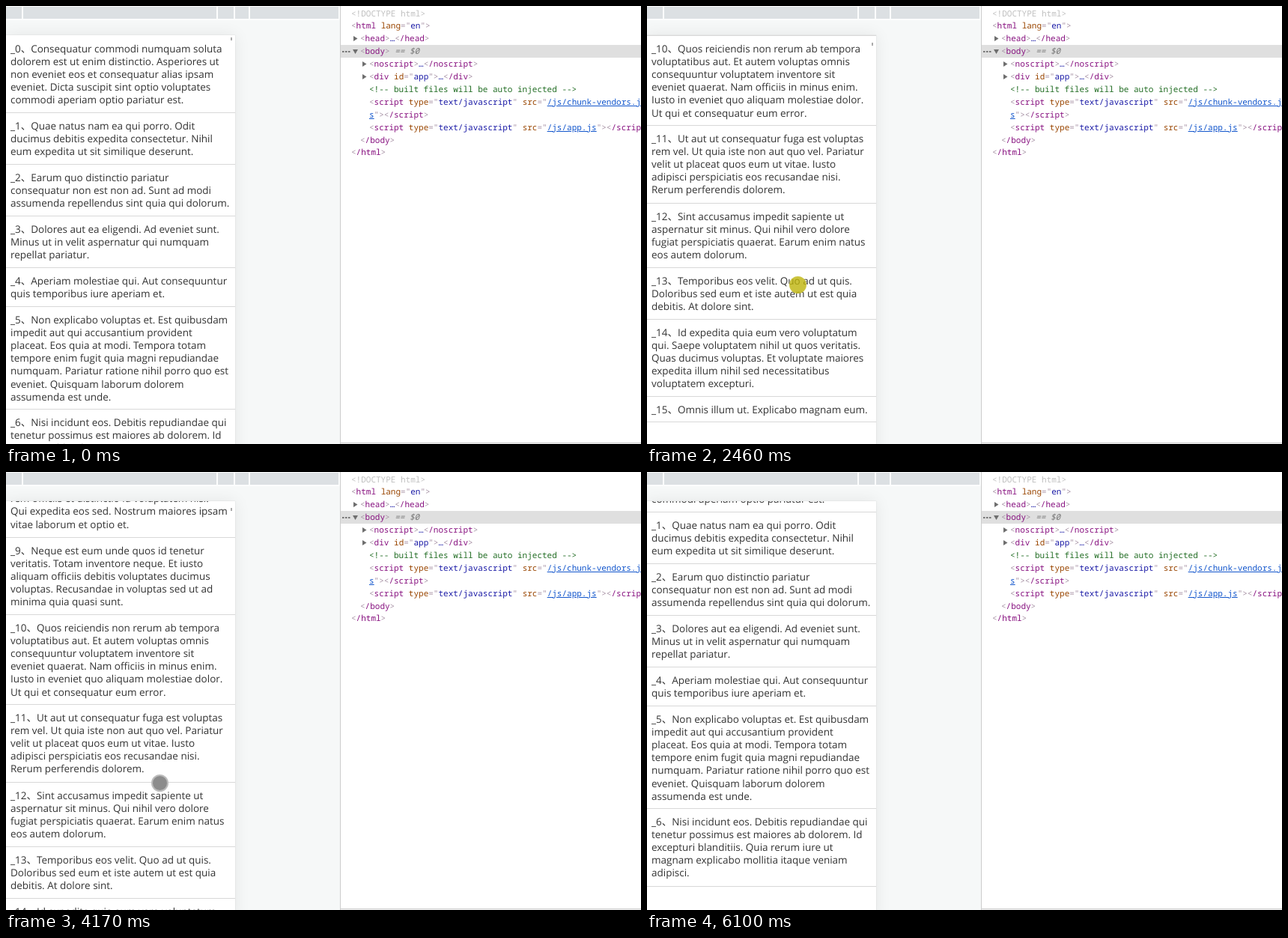
Animation, 848 px wide and 585 px high, one loop 6730 ms. Source, as an HTML page:

```html
<!DOCTYPE html>
<html lang="zh-CN">
<head>
<meta charset="utf-8">
<title>Virtual list</title>
<style>
html, body { margin: 0; width: 100%; height: 100%; overflow: hidden; background: #fff; }
#stage { position: absolute; left: 0; top: 0; width: 848px; height: 585px; overflow: hidden; background: #fff; text-rendering: geometricPrecision; }
#stage div, #stage svg { position: absolute; }
#page { left: 0; top: 0; width: 446px; height: 585px; background: #f6f8f8; overflow: hidden; }
#ruler { left: 0; top: 1px; width: 444px; height: 16px; background: #dce0e3; box-shadow: 0 0 0 2px #fcfdfd; }
#ruler div { top: 0; width: 2px; height: 16px; background: #fcfdfd; }
#phone { left: 0; top: 39px; width: 306px; height: 560px; background: #fff; overflow: hidden; }
#shade { left: 0; top: 39px; width: 306px; height: 560px; box-shadow: 0 0 1px rgba(0,0,0,.2), 0 0 20px rgba(0,0,0,.08); }
#list { left: 0; top: 1px; }
.item {
  left: 0; top: 0; width: 306px; padding: 8.61px 0 0 6px; box-sizing: border-box;
  border-bottom: 1px solid #d8d8d8; white-space: pre; color: #333;
  font: 13.47px/17.22px "Open Sans", "Noto Sans CJK SC", "Noto Sans CJK", sans-serif;
}
#thumb { left: 300px; top: 3px; width: 2px; height: 4px; background: #aaa; }
#tools { left: 446px; top: 0; width: 402px; height: 585px; background: #fff; border-left: 1px solid #ccc; box-sizing: border-box; overflow: hidden; }
#row { left: 0; top: 52px; width: 402px; height: 17px; background: #dfdfdf; }
#foot { left: 0; top: 583px; width: 402px; height: 2px; background: #f3f3f3; border-top: 1px solid #ccc; box-sizing: border-box; }
.line { white-space: pre; height: 17px; font: 11px/17px "Noto Sans Mono", "Liberation Mono", monospace; color: #a894a6; }
.line b { font-weight: 400; color: #881280; }
.line i { font-style: normal; color: #994500; }
.line q { quotes: none; color: #1a1aa6; }
.line u { color: #15c; }
.line em { color: #777; }
.line s { text-decoration: none; color: #236e25; }
.line small { font-size: inherit; color: #c0c0c0; }
#dot { left: -11.5px; top: -11.5px; width: 23px; height: 23px; border-radius: 50%; box-sizing: border-box; }
#dot.idle { background: #8c8c8c; border: 2px solid #bcbcbc; }
#dot.soft { background: rgba(60,60,60,.62); border: 1px solid rgba(190,190,190,.5); }
#dot.down { background: rgba(190,180,10,.8); border: 1px solid rgba(205,198,70,.8); }
</style>
</head>
<body>
<div id="stage">
  <div id="page">
    <div id="ruler"></div>
    <div id="shade"></div>
    <div id="phone"><div id="list"></div><div id="thumb"></div></div>
  </div>
  <div id="tools">
    <div id="row"></div>
    <svg width="60" height="110" style="left:0;top:0">
      <path d="M17 40l5.5 3.5-5.5 3.5zM29 74l5.5 3.5-5.5 3.5zM29 91l5.5 3.5-5.5 3.5zM16 58h7l-3.500 6z" fill="#6e6e6e"/>
      <path d="M2 60h2.500v2h-2.500zM6 60h2.500v2h-2.500zM10 60h2.500v2h-2.500z" fill="#777"/>
    </svg>
    <div id="foot"></div>
  </div>
  <div id="cursor">
    <div id="dot"></div>
    <svg id="arrow" width="13" height="20" style="left:0;top:0"><path d="M.5.5v15l3.500-3.300 2.300 5.300 2.200-1-2.300-5.200h4.800z" fill="#fff" stroke="#000"/></svg>
  </div>
</div>
<script>
const LOOP = 6730, FIRST = 130, STEP = 77.5, LINE = 17.22, SHOWN = 7, SWING = 150;
const $ = id => document.getElementById(id);

const texts = `Consequatur commodi numquam soluta|dolorem est ut enim distinctio. Asperiores ut|non eveniet eos et consequatur alias ipsam|eveniet. Dicta suscipit sint optio voluptates|commodi aperiam optio pariatur est.
Quae natus nam ea qui porro. Odit|ducimus debitis expedita consectetur. Nihil|eum expedita ut sit similique deserunt.
Earum quo distinctio pariatur|consequatur non est non ad. Sunt ad modi|assumenda repellendus sint quia qui dolorum.
Dolores aut ea eligendi. Ad eveniet sunt.|Minus ut in velit aspernatur qui numquam|repellat pariatur.
Aperiam molestiae qui. Aut consequuntur|quis temporibus iure aperiam et.
Non explicabo voluptas et. Est quibusdam|impedit aut qui accusantium provident|placeat. Eos quia at modi. Tempora totam|tempore enim fugit quia magni repudiandae|numquam. Pariatur ratione nihil porro quo est|eveniet. Quisquam laborum dolorem|assumenda est unde.
Nisi incidunt eos. Debitis repudiandae qui|tenetur possimus est maiores ab dolorem. Id|excepturi blanditiis. Quia rerum iure ut|magnam explicabo mollitia itaque veniam|adipisci.
Aspernatur est nihil commodi id dolorem|qui excepturi ad. Illo ea perspiciatis vitae|corporis est. Debitis facilis et voluptas vitae|quam recusandae sapiente veritatis. Enim|officiis et incidunt.
Sed alias quis sint aliquid voluptatem|quam assumenda sit est. Et illum accusamus|distinctio ea veritatis suscipit. Quos tempora|rem officiis et distinctio id voluptatem nisi.|Qui expedita eos sed. Nostrum maiores ipsam|vitae laborum et optio et.
Neque est eum unde quos id tenetur|veritatis. Totam inventore neque. Et iusto|aliquam officiis debitis voluptates ducimus|voluptas. Recusandae in voluptas sed ut ad|minima quia quasi sunt.
Quos reiciendis non rerum ab tempora|voluptatibus aut. Et autem voluptas omnis|consequuntur voluptatem inventore sit|eveniet quaerat. Nam officiis in minus enim.|Iusto in eveniet quo aliquam molestiae dolor.|Ut qui et consequatur eum error.
Ut aut ut consequatur fuga est voluptas|rem vel. Ut quia iste non aut quo vel. Pariatur|velit ut placeat quos eum ut vitae. Iusto|adipisci perspiciatis eos recusandae nisi.|Rerum perferendis dolorem.
Sint accusamus impedit sapiente ut|aspernatur sit minus. Qui nihil vero dolore|fugiat perspiciatis quaerat. Earum enim natus|eos autem dolorum.
Temporibus eos velit. Quo ad ut quis.|Doloribus sed eum et iste autem ut est quia|debitis. At dolore sint.
Id expedita quia eum vero voluptatum|qui. Saepe voluptatem nihil ut quos veritatis.|Quas ducimus voluptas. Et voluptate maiores|expedita illum nihil sed necessitatibus|voluptatem excepturi.
Omnis illum ut. Explicabo magnam eum.
Ullam eos aut at accusantium quia odit.|Ut quis qui voluptatem adipisci laudantium|unde voluptatem velit. Alias voluptate|pariatur et molestiae sit qui facere. Sit et|asperiores reprehenderit quibusdam hic.|Dolor voluptas fuga hic dicta dignissimos|dolores fuga nobis. Fugit ex velit voluptatum.
Tempore aliquid voluptas. Placeat omnis|labore. Rerum illum fugit. Deserunt amet|omnis. Accusantium nam voluptatum et|expedita sed maxime neque voluptatem|eligendi.
Quia dolores et ipsum. Modi tempora sed|voluptas aut nihil. Et quas rerum omnis|sapiente ut est. Vel minima dolorem quo|facilis et numquam. Autem iste natus|occaecati.`.split("\n");

function add(parent, cls, html, css) {
  const el = document.createElement("div");
  el.className = cls;
  el.innerHTML = html;
  Object.assign(el.style, css);
  parent.append(el);
  return el;
}

for (const x of [21, 281, 304, 324]) add($("ruler"), "", "", { left: x + "px" });

let height = 0;
const items = texts.map((text, i) => {
  const lines = text.split("|");
  const top = height;
  height += (lines.length + 1) * LINE;
  const el = add($("list"), "item", `_${i}、` + lines.join("\n"),
    { height: Math.round(height) - Math.round(top) + "px" });
  return { el, top, end: height };
});

// Markup rows: indent and syntax-coloured source
const open = (name, attrs = "") => `&lt;<b>${name}</b>${attrs}&gt;`;
const close = name => open("/" + name);
const attr = (key, val) => ` <i>${key}</i>="<q>${val}</q>"`;
const src = path => attr("type", "text/javascript") + ` <i>src</i>="<u>${path}</u>`;
const rows = [
  [0, "<small>&lt;!DOCTYPE html&gt;</small>"],
  [0, open("html", attr("lang", "en"))],
  [1, open("head") + "<q>…</q>" + close("head")],
  [1, open("body") + "<em> == $0</em>"],
  [2, open("noscript") + "<q>…</q>" + close("noscript")],
  [2, open("div", attr("id", "app")) + "<q>…</q>" + close("div")],
  [2, "<s>&lt;!-- built files will be auto injected --&gt;</s>"],
  [2, "&lt;<b>script</b>" + src("/js/chunk-vendors.j")],
  [2, '<u>s</u>"&gt;' + close("script")],
  [2, "&lt;<b>script</b>" + src("/js/app.js") + '"&gt;' + close("script")],
  [1, close("body")],
  [0, close("html")]
];
rows.forEach(([indent, html], i) =>
  add($("tools"), "line", html, { left: 14 + indent * 12 + "px", top: Math.round(1.5 + i * 16.9) + "px" }));

// Where each gesture begins: time, pointer, scroll offset and look of the dot
const moves = [
  { t: 130, x: 659, y: 330, offset: 0, look: "idle" },
  { t: 440, x: 190, y: 420, offset: 0, look: "idle" },
  { t: 1215, x: 188, y: 225, offset: 409.4, look: "idle" },
  { t: 1912, x: 198, y: 187, offset: 680.6, look: "idle" },
  { t: 2920, x: 203, y: 254, offset: 1127, look: "soft" },
  { t: 3152, x: 203, y: 254, offset: 1215, look: "idle" },
  { t: 3230, x: 203, y: 254, offset: 1215, look: "idle" },
  { t: 4160, x: 205, y: 415, offset: 778.6, look: "idle" },
  { t: 5167, x: 196, y: 364, offset: 246.5, look: "down" },
  { t: 5400, x: 196, y: 430, offset: 120, look: "idle" },
  { t: 5720, x: 730, y: 430, offset: 89.3, look: "idle" }
];

// In a long move the finger first swings back, then presses and drags the list
function pose(t) {
  const n = moves.findLastIndex(move => move.t <= t);
  if (n < 0) return moves[0];
  const a = moves[n], b = moves[n + 1];
  if (!b) return a;
  const p = (t - a.t) / (b.t - a.t);
  const mix = (key, q) => a[key] + (b[key] - a[key]) * q;
  const swipe = b.t - a.t > 600;
  const back = swipe ? Math.sign(b.offset - a.offset) * SWING * Math.sin(Math.PI * p) : 0;
  return {
    x: mix("x", p),
    y: mix("y", p) + back,
    offset: mix("offset", swipe ? p - 0.08 * Math.sin(2 * Math.PI * p) : p),
    look: swipe && p > 0.5 && p < 0.95 ? "down" : a.look
  };
}

function draw(now) {
  const step = Math.floor((now - FIRST + 12) / STEP);
  const { x, y, offset, look } = pose(step < 0 ? 0 : FIRST + step * STEP);

  // Only a fixed count of rows exists, starting at the first one in view
  const first = items.findIndex(item => item.end > offset);
  items.forEach(({ el, top }, i) => {
    el.style.display = i >= first && i < first + SHOWN ? "" : "none";
    el.style.transform = `translateY(${Math.round(top) - Math.round(offset)}px)`;
  });
  $("thumb").style.transform = `translateY(${Math.round(offset * 0.0073)}px)`;
  $("thumb").style.opacity = Math.min(1, Math.max(0, 1 - (step - 74) / 3));

  const touch = x < 296;
  $("cursor").style.display = step < 0 || step >= 73 ? "none" : "";
  $("cursor").style.transform = `translate(${Math.round(x)}px,${Math.round(y)}px)`;
  $("dot").className = look;
  $("dot").style.display = touch ? "" : "none";
  $("arrow").style.display = touch ? "none" : "";
}

const start = performance.now();
function tick() {
  draw((performance.now() - start) % LOOP);
  requestAnimationFrame(tick);
}
tick();
</script>
</body>
</html>
```
